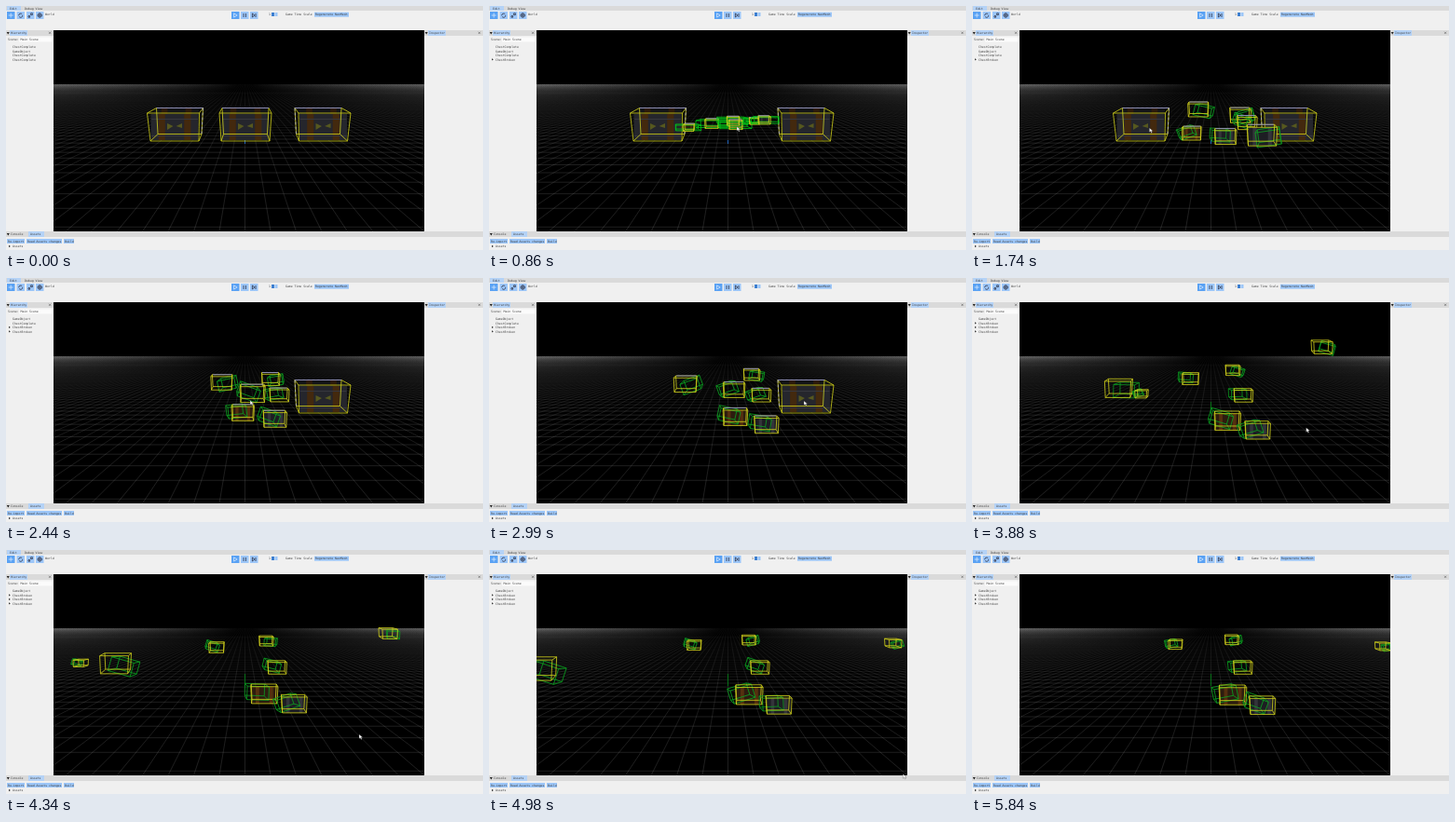
Recreate the animation shown at these times as an HTML page with a canvas. Size 512 px wide and 262 px high, loop 5.95 s.

```html
<!DOCTYPE html>
<html lang="en">
<head>
<meta charset="utf-8">
<title>Breaking chests in a scene editor</title>
<style>
  html, body { margin: 0; width: 100%; height: 100%; overflow: hidden; background: #f0f0f0; }
  canvas, svg { position: absolute; left: 0; top: 0; width: 512px; height: 262px; }
  text { font: 3.2px "DejaVu Sans Mono", monospace; fill: #3c3c3c; white-space: pre; }
</style>
</head>
<body>
<canvas id="floor" width="512" height="262"></canvas>
<canvas id="scene" width="512" height="262"></canvas>
<svg id="ui" viewBox="0 0 512 262"></svg>
<script>
const LOOP = 5950, TICK = 78, THROW = 750;
const BREAKS = { middle: 855, left: 1810, right: 3000 };
const YELLOW = '#d2d21c', GREEN = '#0c9c20', BLUE = '#8686dc';
const BAR = '#dadada', TAB = '#b4d2f6', BUTTON = '#9cc6f8', ACTIVE = '#5aa2f4';
const VIEW = { x: 51, y: 26, w: 398, h: 216 };
const mix = (a, b, k) => a.map((v, i) => v + (b[i] - v) * k);
const clamp = v => Math.min(1, Math.max(0, v));

// ---------- editor panels ----------
const ui = document.getElementById('ui');
function add(tag, attrs, content) {
  const node = document.createElementNS('http://www.w3.org/2000/svg', tag);
  for (const key in attrs) node.setAttribute(key, attrs[key]);
  if (content) node.textContent = content;
  ui.appendChild(node);
  return node;
}
const rect = (x, y, width, height, fill) => add('rect', { x, y, width, height, fill });
const label = (x, y, s) => add('text', { x, y }, s);
const path = (d, fill, stroke = 'none', width = 0.7) => add('path', { d, fill, stroke, 'stroke-width': width });
const arrowDown = (x, y) => path(`M${x} ${y}h3l-1.5 2.4z`, '#222');
const arrowRight = (x, y) => path(`M${x} ${y}v2.4l1.8-1.2z`, '#333');
const cross = (x, y) => path(`M${x} ${y}l2.2 2.2m0-2.2l-2.2 2.2`, 'none', '#444', 0.5);
function button(x, y, w, s) {
  rect(x, y, w, 5, BUTTON);
  label(x + 1, y + 3.7, s);
}
function icon(x, d, active) {
  rect(x, 6, 8.5, 8, active ? ACTIVE : BUTTON);
  path(`M${x + 4.2} 10${d}`, 'none', active ? '#e2efff' : '#223');
}
function panel(x, w, title) {
  rect(x, 26, w, 216, '#f0f0f0');
  rect(x, 26, w, 6, BAR);
  rect(x + 4, 26, 19, 6, TAB);
  arrowDown(x + 0.7, 28);
  label(x + 5, 30.3, title);
  cross(x + w - 5, 27.7);
}

rect(0, 0, 512, 26, '#f0f0f0');
rect(0, 0, 512, 5, BAR);
rect(1, 0, 15, 5, TAB);
label(4, 3.5, 'Edit');
label(20, 3.5, 'Debug View');
icon(1, 'm-2.5 0h5m-2.5-2.5v5', true);
icon(11.5, 'm-2 .3a2 2 0 0 1 3.6-1.4m.4 1.2a2 2 0 0 1-3.6 1.4');
icon(22, 'm-2.2 2.2h1.6v-1.6h-1.6zm2.6-2.6h1.8v-1.8h-1.8z');
icon(32, 'm0-2.2a2.2 2.2 0 1 0 .1 0zm0 0v4.4m-2.2-2.2h4.4');
label(42, 10, 'World');
icon(242, 'm-1.6-2.1v4.2l3.6-2.1z', true);
icon(252, 'm-1.2-2v4m2.4-4v4');
icon(262, 'm-1.8-2v4l2.6-2zm3.6 0v4');
label(282, 10.4, '1');
rect(285, 7, 3, 4, '#3d7fd0');
rect(288.5, 7, 3, 4, BUTTON);
label(300, 10.4, 'Game Time Scale');
button(331, 6.7, 37, 'Regenerate NavMesh');

panel(0, 51, 'Hierarchy');
panel(449, 63, 'Inspector');
label(2, 37, 'Scene:');
rect(14, 33.5, 36, 5, '#fbfbfb');
label(15.5, 37, 'Main Scene');
const rows = Array.from({ length: 4 }, (_, i) => {
  const y = 45.2 + i * 4.5;
  return { text: label(7, y, ' '), arrow: arrowRight(3, y - 2.5) };
});

rect(0, 242, 512, 20, '#f0f0f0');
rect(0, 242, 512, 6, BAR);
rect(24, 242, 17, 6, TAB);
arrowDown(0.8, 244);
label(5, 246.3, 'Console');
label(26, 246.3, 'Assets');
button(1, 250, 19, 'Re-import');
button(22, 250, 38, 'Read Assets changes');
button(62, 250, 11, 'Build');
arrowRight(3, 256.8);
label(7, 259.4, 'Assets');

const pointer = path('M0 0v4.6l1.2-1 .9 1.8.9-.4-.8-1.8h1.6z', '#fff', '#333', 0.3);

function showHierarchy(t) {
  const broken = Object.values(BREAKS).filter(start => t >= start).length;
  const names = [...Array(3 - broken).fill('ChestComplete'), ...Array(broken).fill('ChestBroken')];
  names.splice(broken < 2 ? 1 : 0, 0, 'GameObject');
  rows.forEach((row, i) => {
    row.text.textContent = names[i];
    row.arrow.style.display = names[i] === 'ChestBroken' ? '' : 'none';
  });
}

// ---------- floor grid ----------
(function drawFloor() {
  const c = document.getElementById('floor').getContext('2d');
  const horizon = 77, far = 84, near = 242, depth = 1122, spread = 1 / 6;
  const gray = alpha => `rgba(150,150,150,${alpha})`;
  c.fillStyle = '#000';
  c.fillRect(VIEW.x, VIEW.y, VIEW.w, VIEW.h);
  c.beginPath();
  c.rect(VIEW.x, far, VIEW.w, near - far);
  c.clip();
  c.lineWidth = 0.8;
  const fade = c.createLinearGradient(0, far, 0, near);
  fade.addColorStop(0, gray(0.06));
  fade.addColorStop(0.3, gray(0.18));
  fade.addColorStop(1, gray(0.27));
  c.strokeStyle = fade;
  c.beginPath();
  for (let i = -170; i <= 170; i++) {
    c.moveTo(256.5 + i * (far - horizon) * spread, far);
    c.lineTo(256.5 + i * (near - horizon) * spread, near);
  }
  c.stroke();
  // Rows closer together than a few pixels dim in proportion to their gap.
  for (let z = 7; z < 150; z++) {
    const gap = depth / (z * z);
    c.strokeStyle = gray(0.26 * Math.min(1, gap / 4));
    c.beginPath();
    c.moveTo(VIEW.x, horizon + depth / z);
    c.lineTo(VIEW.x + VIEW.w, horizon + depth / z);
    c.stroke();
  }
})();

// ---------- chests and debris ----------
const g = document.getElementById('scene').getContext('2d');

function line(color, ...points) {
  g.strokeStyle = color;
  g.beginPath();
  points.forEach(p => g.lineTo(...p));
  g.stroke();
}
// A face seen from above: its upper edge is a little wider than the lower one.
const face = (x, y, w, h, flare = 0) => [
  [x - w / 2 - flare, y - h / 2], [x + w / 2 + flare, y - h / 2], [x + w / 2, y + h / 2], [x - w / 2, y + h / 2]];

function wire(color, front, back) {
  line(color, ...back, back[0]);
  line(color, ...front, front[0]);
  front.forEach((p, i) => line(color, p, back[i]));
}
function texture(x, y, w, h, base, strap) {
  g.fillStyle = base;
  g.fillRect(x - w / 2, y - h / 2, w, h);
  g.fillStyle = strap;
  for (const side of [-0.27, 0.27]) g.fillRect(x + (side - 0.07) * w, y - h / 2, w * 0.14, h);
}

function chest(x, side) {
  const front = face(x, 130, 52, 30, 2);
  const back = face(x - side * 5.5, 123.5, 47, 28, 1.5);
  front[0][0] += side * 1.5;
  front[1][0] += side * 1.5;
  texture(x - side * 2, 114, 48, 8, '#131417', '#2c1a09');
  texture(x, 130, 51, 28, '#25262c', '#43290e');
  g.fillStyle = '#36373e';
  for (const y of [121, 139]) g.fillRect(x - 25, y, 50, 1);
  g.fillStyle = '#56581f';
  for (const dir of [-1, 1]) {
    g.beginPath();
    g.moveTo(x + dir * 8, 126);
    g.lineTo(x + dir * 1.5, 129);
    g.lineTo(x + dir * 8, 132 - dir);
    g.fill();
  }
  wire(YELLOW, front, back);
  line(BLUE, back[0], back[1]);
  if (side) {
    const outer = side < 0 ? [back[1], back[2]] : [back[0], back[3]];
    g.setLineDash([3, 2]);
    line('#b8b8d8', ...outer);
    g.setLineDash([]);
  }
}

// Each piece is thrown from its chest to `mid`, then rolls to `end`; points are x, y, width.
// Resting pieces slow down, pieces with `exit` speed up until they leave the view.
const brown = ['#2c1c0f', '#55300f'], stone = ['#1d1e23', '#33343a'];
const pieces = [
  { chest: 'middle', from: [214, 131, 11], mid: [232, 136, 19], end: [280, 157, 28], skin: brown },
  { chest: 'middle', from: [239, 127, 14], mid: [243, 112, 21], end: [40, 130, 34], exit: 5000 },
  { chest: 'middle', from: [265, 128, 14], mid: [269, 139, 22], end: [312, 168, 26], skin: stone },
  { chest: 'middle', from: [285, 124, 10], mid: [289, 120, 22], end: [279, 97, 14] },
  { chest: 'middle', from: [262, 124, 13], mid: [296, 126, 20], end: [291, 127, 19] },
  { chest: 'middle', from: [296, 123, 12], mid: [308, 138, 29], end: [623, 330, 130], exit: 2640, skin: stone },
  { chest: 'left', from: [182, 128, 24], mid: [284, 130, 26], end: [218, 102, 14] },
  { chest: 'right', from: [340, 126, 16], mid: [370, 72, 20], end: [444, 104, 12] },
  { chest: 'right', from: [340, 130, 14], mid: [183, 125, 12], end: [-20, 119, 10], exit: 4500 },
];

function placePiece({ from, mid, end, exit }, start, t) {
  const k = (t - start) / THROW;
  if (k < 1) {
    const [x, y, w] = mix(from, mid, k);
    return [x, y - 8 * Math.sin(Math.PI * k), w];
  }
  const landed = start + THROW;
  const roll = clamp((t - landed) / ((exit || LOOP) - landed));
  return mix(mid, end, exit ? roll ** 2 : 1 - (1 - roll) ** 3);
}

function drawPiece(piece, index, t) {
  const start = BREAKS[piece.chest];
  if (t < start || t > (piece.exit || LOOP)) return;
  const [x, y, w] = placePiece(piece, start, t);
  const age = (t - start) / 1000, h = w * 0.66, dir = index % 2 ? 1 : -1;
  const dx = (256 - x) * 0.03, dy = -h * 0.2;
  if (piece.skin) texture(x, y, w, h, ...piece.skin);

  // Colliders begin as long planks, then tumble beside the bounds.
  const plank = piece.chest === 'middle' ? Math.exp(-age * 5) : 0;
  const drift = Math.min(1, age) * w * 0.25 * dir;
  g.save();
  g.translate(x + drift, y + drift * 0.3);
  g.rotate(0.35 * dir * Math.sin(age * 1.8 + index * Math.min(1, age)));
  const gw = w * (0.85 + plank * 1.6);
  wire(plank > 0.3 ? '#00c818' : GREEN, face(0, 0, gw, h * 0.8), face(dx + 3 * dir, dy, gw * 0.9, h * 0.7));
  g.restore();
  wire(YELLOW, face(x, y, w, h, w * 0.03), face(x + dx, y + dy, w * 0.92, h * 0.9, w * 0.03));
  if (t < BREAKS.right) line(BLUE, [x + dx - w * 0.46, y + dy - h * 0.45], [x + dx + w * 0.46, y + dy - h * 0.45]);
}

// The pointer visits each chest shortly before it breaks, then leaves.
const stops = [
  { at: 200, pos: [423, 231] },
  { at: 770, pos: [266, 129.5] },
  { at: 1000, pos: [266, 129.5] },
  { at: 1720, pos: [190, 131] },
  { at: 1900, pos: [190, 131] },
  { at: BREAKS.right, pos: [343, 132] },
  { at: 3460, pos: [343, 132] },
  { at: 4290, pos: [379, 198] },
  { at: 5140, pos: [468, 256] },
];
function movePointer(t) {
  const next = Math.max(1, stops.findIndex(stop => stop.at > t));
  const last = t >= stops[stops.length - 1].at;
  const b = last ? stops[stops.length - 1] : stops[next], a = last ? b : stops[next - 1];
  const [x, y] = last ? b.pos : mix(a.pos, b.pos, clamp((t - a.at) / (b.at - a.at)));
  pointer.setAttribute('transform', `translate(${x} ${y})`);
  pointer.style.display = t >= 190 && t < 5200 ? '' : 'none';
}

function render(t) {
  g.clearRect(0, 0, 512, 262);
  g.save();
  g.beginPath();
  g.rect(VIEW.x, VIEW.y, VIEW.w, VIEW.h);
  g.clip();
  g.lineWidth = 0.8;
  const early = t < BREAKS.right;
  g.fillStyle = early ? '#2264b8' : '#087018';
  g.fillRect(256, early ? 144 : 133, 1, early ? 4 : 13);
  if (t < BREAKS.left) chest(181, -1);
  if (t < BREAKS.middle) chest(257, 0);
  if (t < BREAKS.right) chest(340.5, 1);
  pieces.forEach((piece, i) => drawPiece(piece, i, t));
  g.restore();
  showHierarchy(t);
  movePointer(t);
}

const origin = performance.now();
let shown = -1;
function frame() {
  const now = (performance.now() - origin) % LOOP;
  const t = Math.floor(now / TICK) * TICK;
  if (t !== shown) render(shown = t);
  requestAnimationFrame(frame);
}
frame();
</script>
</body>
</html>
```
